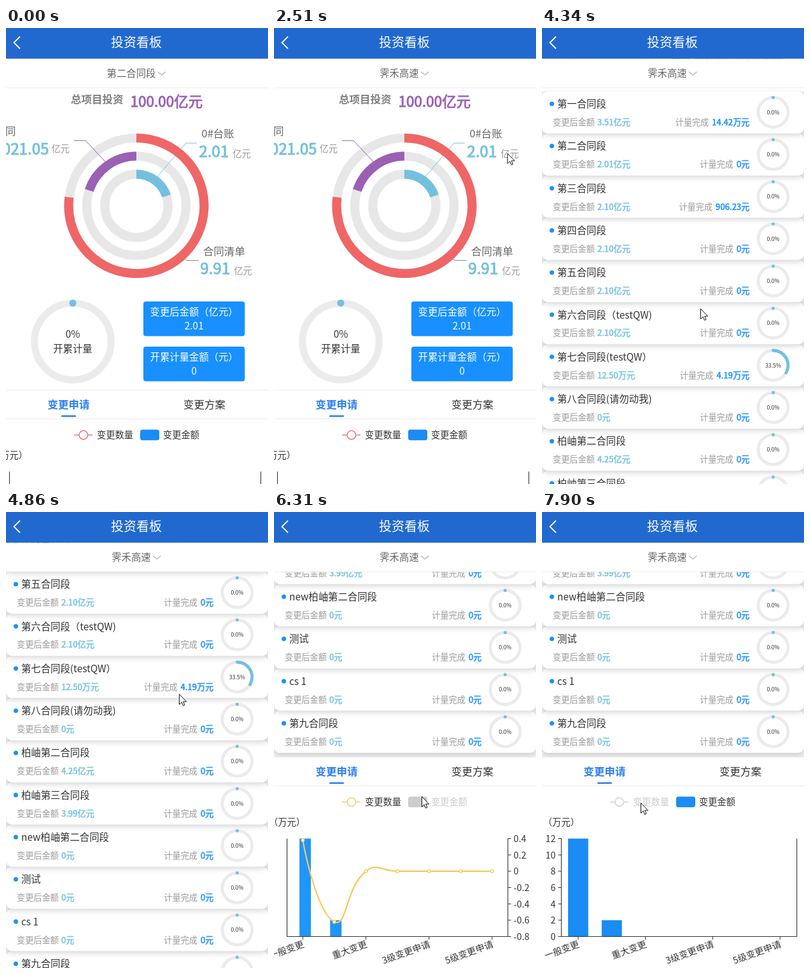
Write an HTML page that moves like this. It is 412 px wide and 717 px high and loops after 8000 ms.

```html
<!DOCTYPE html>
<html lang="zh-CN">
<head>
<meta charset="utf-8">
<title>投资看板</title>
<style>
html, body { margin: 0; height: 100%; overflow: hidden; background: #fff; }
svg { display: block; width: 412px; height: 717px; font-family: "Noto Sans CJK SC", "Noto Sans CJK", "Noto Sans CJK JP", sans-serif; }
text { white-space: pre; }
.heavy { stroke-width: .04em; stroke: currentColor; fill: currentColor; }
.card { filter: drop-shadow(0 3px 4px rgba(0, 0, 0, .16)); }
.panel { filter: drop-shadow(0 2px 4px rgba(0, 0, 0, .3)); }
</style>
</head>
<body>
<svg id="stage" viewBox="0 0 412 717"></svg>
<script>
const STEP = 131.3, LOOP = 8000;
const BLUE = '#1890ff', SKY = '#73c0de', PURPLE = '#9a60b4', RED = '#ef6666', GOLD = '#fac858', GREEN = '#1aad19';
const TRACK = '#e7e7e7', INK = '#333', RULE = '#ececec';
const S = 14.28, M = 15.38, L = 16.48;

function el(parent, tag, attrs = {}, content) {
  const node = document.createElementNS('http://www.w3.org/2000/svg', tag);
  set(node, attrs);
  if (content !== undefined) node.textContent = content;
  parent.appendChild(node);
  return node;
}
function set(node, attrs) {
  for (const key in attrs) node.setAttribute(key, attrs[key]);
}
const group = parent => el(parent, 'g');
const show = (node, on) => set(node, { display: on ? 'inline' : 'none' });
const rect = (p, x, y, width, height, fill, more) => el(p, 'rect', { x, y, width, height, fill, ...more });
const dot = (p, cx, cy, r, fill, more) => el(p, 'circle', { cx, cy, r, fill, ...more });
const line = (p, d, stroke, w = 1) => el(p, 'path', { d, stroke, 'stroke-width': w, fill: 'none' });

// y is the vertical middle of the glyphs
function label(p, x, y, size, fill, str, anchor = 'start', more) {
  return el(p, 'text', { x, y: y + size * .375, 'font-size': size, fill, 'text-anchor': anchor, ...more }, str);
}
const heavy = color => ({ class: 'heavy', color });

// arc measured in turns, clockwise from the top
function arc(p, cx, cy, r, from, to, color, w, more) {
  const pt = a => `${cx + r * Math.sin(a * 2 * Math.PI)} ${cy - r * Math.cos(a * 2 * Math.PI)}`;
  const d = `M${pt(from)}A${r} ${r} 0 ${to - from > .5 ? 1 : 0} 1 ${pt(to)}`;
  return set(line(p, d, color, w), more || {});
}
const ring = (p, cx, cy, r, color, w) => dot(p, cx, cy, r, 'none', { stroke: color, 'stroke-width': w });

// linear interpolation over [step, ...values] keys
function at(keys, k) {
  if (k <= keys[0][0]) return keys[0].slice(1);
  for (let i = 1; i < keys.length; i++) {
    const a = keys[i - 1], b = keys[i];
    if (k <= b[0]) return b.slice(1).map((v, j) => a[j + 1] + (v - a[j + 1]) * (k - a[0]) / (b[0] - a[0]));
  }
  return keys[keys.length - 1].slice(1);
}

const stage = document.getElementById('stage');
rect(stage, 0, 0, 412, 717, '#f0f0f0');
const page = group(stage);
rect(page, 0, 90, 412, 479, '#fff');

// summary rings
label(page, 102, 112, L, '#808080', '总项目投资', 'start', { 'font-weight': 700 });
label(page, 195.5, 116, 22.5, PURPLE, '100.00亿元', 'start', heavy(PURPLE));
for (const r of [106.5, 78, 49.7]) ring(page, 205, 279.5, r, TRACK, 14.2);
line(page, 'M107 177H125L157 211', '#8d5ba6');
line(page, 'M300 181H283L236 236', SKY);
line(page, 'M303 365.5H285L274 360', '#7d8e96');
arc(page, 205, 279.5, 106.5, 0, .77, RED, 14.2);
arc(page, 205, 279.5, 78, .8, 1, PURPLE, 14.2);
arc(page, 205, 279.5, 49.7, 0, .2, SKY, 14.2);
label(page, 15.5, 162, L, '#666', '合同', 'end');
label(page, 71.5, 190, S, '#999', '亿元');
label(page, 307.5, 166, L, '#666', '0#台账');
label(page, 310, 350.5, L, '#666', '合同清单');

function figures(contract, ledger, bill) {
  const g = group(page);
  label(g, 67.5, 190, 24.17, SKY, contract, 'end', heavy(SKY));
  for (const [x, y, str] of [[303.5, 194, ledger], [305.5, 378, bill]]) {
    const t = label(g, x, y, 24.17, SKY, '');
    el(t, 'tspan', heavy(SKY), str);
    el(t, 'tspan', { dx: 6, 'font-size': S, fill: '#999' }, '亿元');
  }
  return g;
}
const figuresOne = figures('021.05', '2.01', '9.91');
const figuresAll = figures('033.16', '18.15', '50.17');

function meter(cx, percent, bx, bw, pairs) {
  const g = group(page);
  ring(g, cx, 493, 60.3, '#ebebeb', 11);
  dot(g, cx, 432.5, 5.5, SKY);
  label(g, cx, 481.5, M, INK, percent, 'middle');
  label(g, cx, 504, M, INK, '开累计量', 'middle');
  pairs.forEach(([name, value], i) => {
    const y = 430 + i * 71;
    rect(g, bx, y, bw, 54.5, BLUE, { rx: 4 });
    label(g, bx + bw / 2, y + 16, M, '#fff', name, 'middle');
    label(g, bx + bw / 2, y + 38.5, M, '#fff', value, 'middle');
  });
  return g;
}
const meterOne = meter(105, '0%', 216, 159.5, [['变更后金额（亿元）', '2.01'], ['开累计量金额（元）', '0']]);
const meterAll = meter(101.5, '0.008%', 204.5, 175, [['变更后金额（亿元）', '22.15'], ['开累计量金额（万元）', '18.69']]);

// section cards: name, amount, done, percent
const rows = [
  ['第一合同段', '3.51亿元', '14.42万元'], ['第二合同段', '2.01亿元'], ['第三合同段', '2.10亿元', '906.23元'],
  ['第四合同段', '2.10亿元'], ['第五合同段', '2.10亿元'], ['第六合同段（testQW)', '2.10亿元'],
  ['第七合同段(testQW）', '12.50万元', '4.19万元', 33.5], ['第八合同段(请勿动我)', '0元'],
  ['柏岫第二合同段', '4.25亿元'], ['柏岫第三合同段', '3.99亿元'], ['new柏岫第二合同段', '0元'],
  ['测试', '0元'], ['cs 1', '0元'], ['第九合同段', '0元']
];
const list = group(page);
for (let i = rows.length - 1; i >= 0; i--) {
  const [name, amount, done = '0元', percent = 0] = rows[i];
  const y = 588.3 + 66.3 * i;
  rect(list, 0, y - 19.8, 412, 66.3, '#fff', { rx: 9, class: 'card' });
}
rows.forEach(([name, amount, done = '0元', percent = 0], i) => {
  const y = 588.3 + 66.3 * i;
  dot(list, 15.5, y, 3.5, BLUE);
  label(list, 24, y, M, INK, name);
  const left = label(list, 17, y + 28.7, 13.18, '#999', '变更后金额');
  el(left, 'tspan', { dx: 4, ...heavy(SKY) }, amount);
  const right = label(list, 326.5, y + 28.7, 13.18, '#999', '计量完成', 'end');
  el(right, 'tspan', { dx: 5, ...heavy(BLUE) }, done);
  ring(list, 363.5, y + 13.3, 23.4, '#ebebeb', 4.8);
  if (percent) arc(list, 363.5, y + 13.3, 23.4, 0, percent / 100, SKY, 4.8, { 'stroke-linecap': 'round' });
  else dot(list, 363.5, y - 10.1, 2.5, SKY);
  label(list, 363.5, y + 13.3, 8.7, INK, percent.toFixed(1) + '%', 'middle');
});

// tabs, legend and chart
const foot = group(page);
rect(foot, 0, 385, 412, 340, '#fff');
line(foot, 'M0 385.5H412M0 430.5H412', RULE);
label(foot, 98.5, 408, L, '#2b7ff0', '变更申请', 'middle', { 'font-weight': 700 });
label(foot, 312, 408, L, INK, '变更方案', 'middle');
rect(foot, 87, 425, 23, 2.4, '#2b7ff0', { rx: 1.2 });
const chart = group(foot);

const TOP = 513.5, BASE = 667.5, GAP = (BASE - TOP) / 6;
const counts = [.38, -.62, 0, 0, 0, 0, 0], sums = [12, 2];
const names = ['一般变更', '重大变更', '3级变更申请', '5级变更申请'];

function smooth(pts) {
  const len = (a, b) => Math.hypot(b[0] - a[0], b[1] - a[1]);
  let d = `M${pts[0]}`, out = pts[0];
  for (let i = 1; i < pts.length; i++) {
    const p = pts[i], prev = pts[i - 1], next = pts[i + 1];
    let cin = p, cout = p;
    if (next) {
      const a = len(prev, p), b = len(p, next);
      const shift = f => p.map((v, j) => v + (next[j] - prev[j]) * .5 * f / (a + b));
      cin = shift(-a);
      cout = shift(b);
    }
    d += `C${out} ${cin} ${p}`;
    out = cout;
  }
  return d;
}

function drawChart(k) {
  chart.textContent = '';
  const loaded = k >= 24, bars = k < 48 || k >= 54, curve = k < 58;
  const off = '#ccc', tone = curve ? (loaded ? GOLD : RED) : off;
  line(chart, 'M107 456H136', tone, 1.3);
  dot(chart, 121.8, 456, 6.8, '#fff', { stroke: tone, 'stroke-width': 1.3 });
  label(chart, 143, 456, S, curve ? INK : off, '变更数量');
  rect(chart, 211, 447.5, 30, 16.8, bars ? '#1a8cf3' : off, { rx: 3.5 });
  label(chart, 247, 456, S, bars ? INK : off, '变更金额');

  const [x0] = loaded ? at([[47, 30.4], [48, 20.5], [49, 9], [50, 5.5], [53, 5.5], [54, 20], [55, 30.4]], k) : [5.5];
  const [x1] = loaded ? at([[57, 367.8], [58, 382], [59, 396], [60, 400.7]], k) : [400.7];
  const band = (x1 - x0) / 7, mid = i => x0 + band * (i + .5);
  label(chart, x0, 488, S, INK, '（万元）', 'middle');

  if (loaded) {
    const [w] = k < 54 ? at([[47, 1], [48, .62], [49, .15], [50, 0]], k) : [1];
    const [h] = k < 54 ? [1] : at([[53, 0], [54, .6], [55, 1]], k);
    const step = (x1 - 30.4) / 7;
    sums.forEach((v, i) => {
      const tall = v / 2 * GAP * h;
      rect(chart, 30.4 + step * (i + .2), BASE - tall, step * .6 * w, tall, bars ? '#1a8cf3' : '#1e96fc');
    });
  }
  line(chart, `M${x0} ${TOP}V${BASE}H${x1}V${TOP}`, INK, 1.1);
  if (!loaded) return;

  for (let i = 0; i <= 6; i++) {
    const y = BASE - i * GAP;
    if (bars) {
      line(chart, `M${x0 - 5} ${y}H${x0}`, INK);
      label(chart, x0 - 9, y, S, INK, i * 2, 'end');
    }
    if (curve) {
      line(chart, `M${x1} ${y}h5`, INK);
      label(chart, x1 + 9, y, S, INK, +(i * .2 - .8).toFixed(1));
    }
  }
  names.forEach((name, i) => {
    const x = mid(i * 2);
    line(chart, `M${x} ${BASE}v5`, INK);
    label(chart, 0, 0, S, INK, name, 'end', { transform: `translate(${x + 1} 678.5) rotate(-20)` });
  });
  if (curve) {
    const pts = counts.map((v, i) => [mid(i), BASE - (v + .8) / .2 * GAP]);
    line(chart, smooth(pts), GOLD, 2.2);
    for (const [x, y] of pts) dot(chart, x, y, 2.5, '#fff', { stroke: GOLD, 'stroke-width': 1.2 });
  }
}

// section picker
const picker = group(stage);
const shade = rect(picker, 0, 94, 412, 623, '#000');
const sheet = rect(picker, 0, 94, 412, 606, '#fff', { class: 'panel' });
const mask = rect(el(el(stage, 'defs'), 'clipPath', { id: 'fold' }), 0, 94, 412, 606, '#fff');
const options = el(picker, 'g', { 'clip-path': 'url(#fold)' });
const marks = [];
['霁禾高速', '第九合同段', '第一合同段', '柏岫第二合同段', '第二合同段', '柏岫第三合同段', '第三合同段',
  'new柏岫第二合同段', '第四合同段', '第五合同段', '第六合同段（testQW)', '第七合同段(testQW）', '第八合同段(请勿动我)'
].forEach((name, i) => {
  const y = 127 + 45 * i;
  label(options, i ? 38 : 21, y, S, '#777', name);
  dot(options, 383.6, y - .2, 11.3, '#fff', { stroke: GREEN, 'stroke-width': 1.3 });
  marks.push(dot(options, 383.6, y - .2, 7.3, GREEN));
});
el(options, 'path', { d: 'M4 122.5H16.500L10.2 131Z', fill: '#b5b5b5' });

// fixed header
rect(stage, 0, 0, 412, 48.5, '#2269cf');
line(stage, 'M22 13.500L12.5 23L22 32.500', '#fff', 1.8);
label(stage, 205, 22, 20, '#fff', '投资看板', 'middle');
rect(stage, 0, 48.5, 412, 45.5, '#fff');
const rule = rect(stage, 0, 93.500, 412, 1, RULE);
const title = label(stage, 197, 71, M, '#666', '', 'middle');
const chevron = line(stage, 'M0 0', '#ccc', 1.7);

const halo = dot(stage, 0, 0, 12, '#e6e022', { opacity: .65 });
const cursor = el(stage, 'path', {
  d: 'M.5 .5V16.500L4.2 13L6.6 18.500L9 17.500L6.700 12.200H11.700Z', fill: '#fff', stroke: '#111', 'stroke-linejoin': 'round'
});

const cursorPath = [
  [1, 357, 487], [2, 290, 250], [3, 204, 69], [4, 204, 69], [5, 212, 77], [7, 212, 77], [9, 210, 79], [10, 225, 112],
  [11, 262, 165], [12, 330, 160], [13, 372, 140], [14, 380, 130], [18, 380, 130], [21, 340, 330], [24, 300, 500],
  [27, 278, 550], [29, 278, 550], [31, 262, 470], [33, 249, 441], [35, 262, 400], [37, 272, 286], [38, 280, 400],
  [40, 285, 260], [42, 285, 239], [45, 255, 380], [47, 232, 446], [48, 232, 447], [50, 232, 452], [55, 232, 452],
  [57, 157, 457], [60, 155, 457]
];
const scrollPath = [
  [29, 0], [30, 70], [31, 210], [32, 375], [33, 469], [34, 505], [35, 545], [36, 640], [37, 740],
  [38, 850], [39, 955], [40, 1040], [41, 1095], [42, 1118]
];
const presses = [[5, 7], [15, 18], [29, 31], [35, 36], [38, 39], [47, 47], [53, 54], [57, 58]];

function draw(k) {
  const open = k >= 5 && k < 19, all = k >= 18, data = k >= 20, loaded = k >= 24;
  const [scroll] = at(scrollPath, k);
  set(page, { transform: `translate(0 ${-scroll})` });
  show(figuresOne, !data);
  show(figuresAll, data);
  show(meterOne, !loaded);
  show(meterAll, loaded);
  show(list, loaded);
  set(foot, { transform: `translate(0 ${loaded ? 1118 : 184})` });
  drawChart(k);

  const [fold] = at([[4, 0], [5, .3], [6, .78], [7, 1], [17, 1], [18, .5], [19, 0]], k);
  show(picker, open);
  show(rule, !open);
  set(shade, { opacity: .15 * fold });
  set(sheet, { height: 606 * fold });
  set(mask, { height: 606 * fold });
  marks.forEach((m, i) => show(m, i === (k < 17 ? 4 : 0)));

  const name = all ? '霁禾高速' : '第二合同段', cx = 197 + name.length * M / 2 + 9.5;
  title.textContent = name;
  set(title, { fill: open ? '#3a7bdd' : '#666' });
  set(chevron, {
    d: open ? `M${cx - 6} 73.500L${cx} 68.500L${cx + 6} 73.500` : `M${cx - 6} 69L${cx} 74L${cx + 6} 69`,
    stroke: open ? '#4a74c0' : '#c4c4c4'
  });

  const [x, y] = at(cursorPath, k);
  show(cursor, k > 0);
  set(cursor, { transform: `translate(${x} ${y})` });
  show(halo, presses.some(([a, b]) => k >= a && k <= b));
  set(halo, { cx: x, cy: y });
}

// the screen refreshes in steps, like a recording
let last = -1;
const start = performance.now();
function tick() {
  const k = Math.floor((performance.now() - start) % LOOP / STEP);
  if (k !== last) draw(last = k);
  requestAnimationFrame(tick);
}
tick();
</script>
</body>
</html>
```
